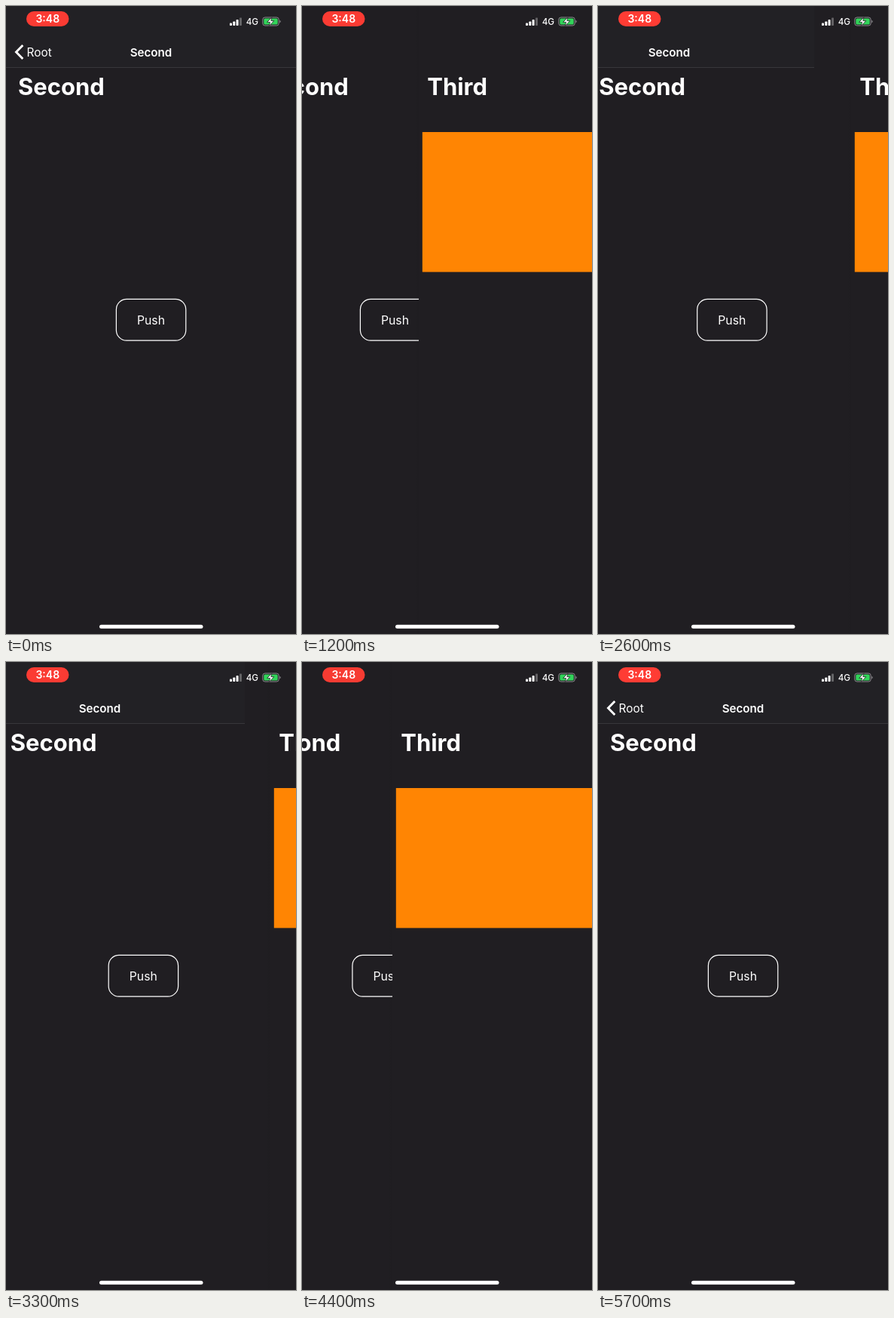
An HTML page for the animation above (5800 ms loop, 385 by 832 pixels).

```html
<!DOCTYPE html>
<html lang="en">
<head>
<meta charset="utf-8">
<title>Swipe back</title>
<style>
  html, body { margin: 0; width: 100%; height: 100%; overflow: hidden; background: #201e22; }
  svg { display: block; width: 100vw; height: 100vh; }
  text { font-family: Inter, Roboto, sans-serif; font-size: 15.4px; fill: #fff; }
  .mid { text-anchor: middle; }
  .large { font-size: 31px; font-weight: 700; }
  .title { font-size: 15.2px; font-weight: 600; }
  .page { fill: #201e22; }
  .line { fill: none; stroke: #fff; }
</style>
</head>
<body>
<svg viewBox="0 0 385 832">
  <defs>
    <linearGradient id="shade">
      <stop offset="0" stop-color="#000" stop-opacity="0"/>
      <stop offset="1" stop-color="#000" stop-opacity=".04"/>
    </linearGradient>
    <path id="chevron" class="line" stroke-width="2.9" d="M22.3 52 13.5 61l8.8 9"/>
  </defs>

  <g id="second">
    <rect class="page" width="385" height="832"/>
    <text class="large" x="16" y="118">Second</text>
    <rect class="line" stroke-width="1.2" x="146.4" y="388.4" width="92.4" height="54.8" rx="13.8"/>
    <text class="mid" x="192.5" y="421.6" style="font-size:15.8px">Push</text>
  </g>

  <g id="third">
    <rect x="-6" width="6" height="832" fill="url(#shade)"/>
    <rect class="page" width="385" height="832"/>
    <text class="large" x="11.2" y="118">Third</text>
    <rect x="4.8" y="167" width="375.7" height="185.4" fill="#ff8503"/>
  </g>

  <g id="bar">
    <rect width="385" height="81" fill="#222125"/>
    <rect y="81" width="385" height="1" fill="#38373b"/>
    <g id="secondBar">
      <use href="#chevron"/>
      <text x="27.5" y="66.6">Root</text>
      <text id="secondTitle" class="title mid" x="192.5" y="66.6">Second</text>
    </g>
    <g id="thirdBar">
      <use href="#chevron"/>
      <text x="27.5" y="66.6">Second</text>
      <text id="thirdTitle" class="title mid" x="192.5" y="66.6">Third</text>
    </g>
  </g>

  <g id="status">
    <rect id="pill" x="27" y="7" width="56.5" height="20" rx="10"/>
    <text class="title mid" x="55.3" y="22.2" style="font-size:14px">3:48</text>
    <g fill="#fff">
      <rect x="297" y="22.5" width="3" height="3.5" rx=".8"/>
      <rect x="301.3" y="20.5" width="3" height="5.5" rx=".8"/>
      <rect x="305.6" y="18" width="3" height="8" rx=".8"/>
      <rect x="310" y="15.5" width="3" height="10.5" rx=".8" opacity=".3"/>
    </g>
    <text x="318.7" y="25.3" style="font-size:11.7px;font-weight:500">4G</text>
    <rect x="340.8" y="15" width="21.4" height="11" rx="3" fill="none" stroke="#8b8a8e"/>
    <rect x="342.3" y="16.5" width="18.4" height="8" rx="1.6" fill="#32d45a"/>
    <path d="M363.4 18.8v3.6q1.4-.5 1.4-1.8t-1.4-1.8z" fill="#8b8a8e"/>
    <path d="M353 14.8 346.6 21.4h4l-1.3 5 6.5-6.8h-4z" fill="#fff" stroke="#201e22" stroke-width=".8"/>
  </g>
  <rect x="124" y="819.8" width="137.5" height="5" rx="2.5" fill="#fff"/>
</svg>
<script>
const LOOP = 5800, STEP = 100, WIDTH = 385;
const PUSH_END = 600, POP_END = 5600, PULSE = 3300;

// Push, swipe back and forth, release: [time, left edge of the Third page]
const turns = [
  [0, WIDTH], [PUSH_END, 0], [1850, 330], [2150, 220],
  [2700, 347], [3300, 351], [4900, 50], [POP_END, WIDTH], [LOOP, WIDTH]
];

const ease = u => u * u * (3 - 2 * u);

function edge(t) {
  const i = turns.findIndex(([end]) => t < end);
  const [t0, x0] = turns[i - 1], [t1, x1] = turns[i];
  return Math.round(x0 + (x1 - x0) * ease((t - t0) / (t1 - t0)));
}

const el = id => document.getElementById(id);
const move = (id, x) => el(id).setAttribute('transform', `translate(${x.toFixed(2)} 0)`);
const fade = (id, v) => el(id).setAttribute('opacity', v.toFixed(3));

function draw(t) {
  const x = edge(t), shown = 1 - x / WIDTH;
  const pushing = t <= PUSH_END;
  const swiping = !pushing && t < POP_END;

  move('third', x);
  move('second', -0.3 * (WIDTH - x));

  // The bar runs off at twice the finger's travel while swiping
  move('bar', swiping ? -2 * (WIDTH - x) : 0);
  fade('secondBar', pushing ? 1 - shown : 1);
  fade('thirdBar', pushing ? shown : 0);
  move('secondTitle', pushing ? -138 * shown : 0);
  move('thirdTitle', pushing ? 0.4 * x : 0);

  // The recording pill dims once per pulse
  const dim = Math.max(0, Math.cos(2 * Math.PI * (t - PUSH_END) / PULSE)) ** 2;
  el('pill').setAttribute('fill', `rgb(${255 - 23 * dim}, ${60 - 3 * dim}, ${52 - 5 * dim})`);
}

const start = performance.now();
function tick() {
  const t = (performance.now() - start) % LOOP;
  draw(Math.floor(t / STEP) * STEP);
  requestAnimationFrame(tick);
}
tick();
</script>
</body>
</html>
```
